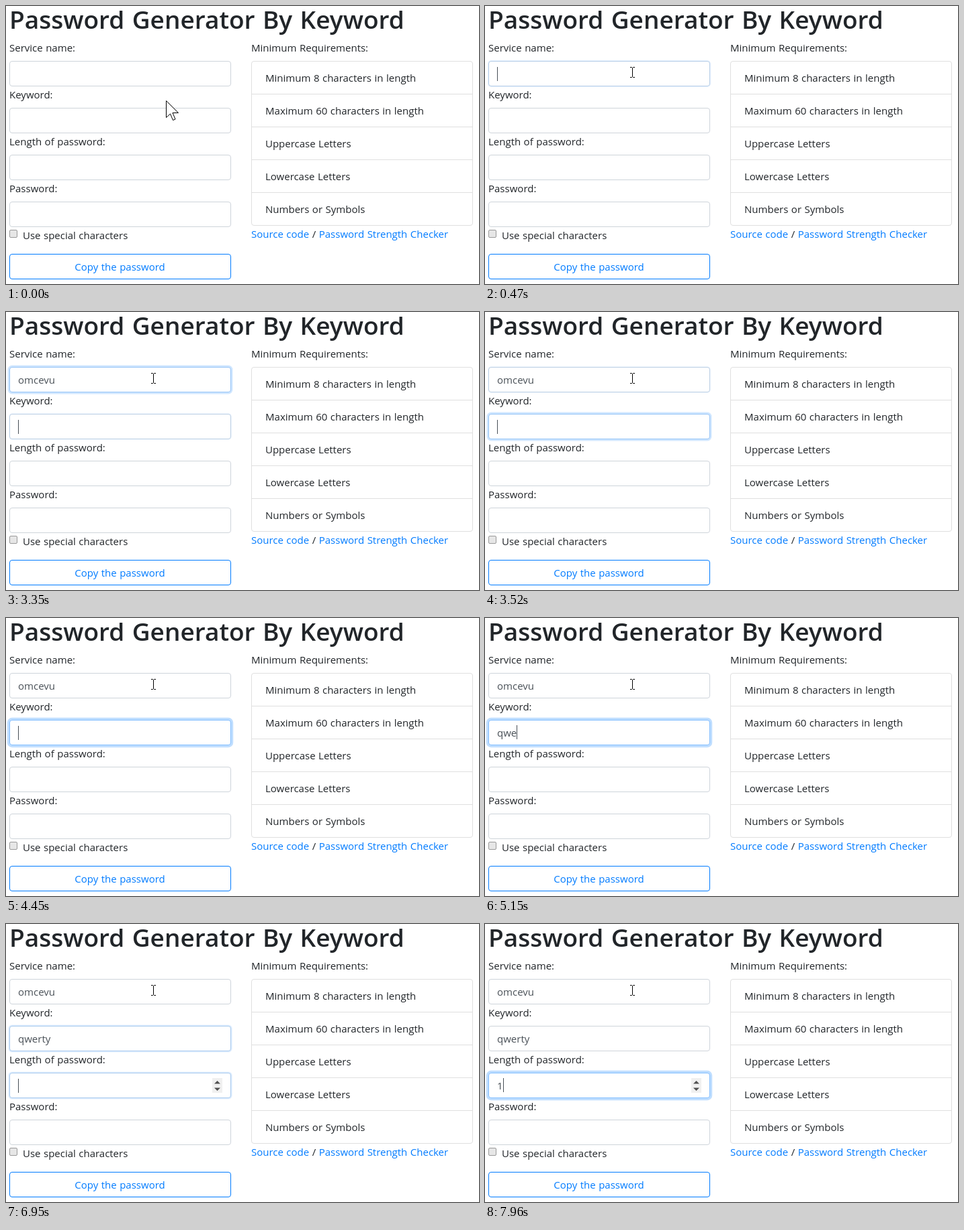
These frames come from a looping animation (704 px wide and 415 px high, 8 s). An HTML page:

```html
<!DOCTYPE html>
<html lang="en">
<head>
<meta charset="utf-8">
<title>Password Generator By Keyword</title>
<style>
  html, body { margin: 0; width: 100%; height: 100%; overflow: hidden; background: #fff; }
  svg { display: block; }
  text { font: 15px "Open Sans", "Noto Sans", sans-serif; word-spacing: .6px; fill: #212529; white-space: pre; }
  .title { font-size: 37px; font-weight: 600; word-spacing: 1.8px; }
  .link { fill: #007bff; }
  .value { fill: #495057; }
  .box { fill: #fff; stroke: #ced4da; }
  .list { fill: none; stroke: #dfdfdf; }
</style>
</head>
<body>
<svg id="stage" width="704" height="415" viewBox="0 0 704 415">
  <text class="title" x="5" y="34">Password Generator By Keyword</text>
  <g id="form"></g>

  <rect x="5.5" y="334.5" width="11" height="11" rx="1.5" fill="#e6e6e6" stroke="#999"/>
  <text x="25" y="348">Use special characters</text>
  <rect x="5.5" y="370.5" width="329" height="37" rx="3.5" fill="#fff" stroke="#007bff"/>
  <text class="link" x="169.5" y="395" text-anchor="middle">Copy the password</text>

  <text x="365" y="68">Minimum Requirements:</text>
  <rect class="list" x="365.5" y="82.5" width="329" height="245" rx="3.5"/>
  <g id="rules"></g>
  <text x="365" y="346"><tspan class="link">Source code</tspan> / <tspan class="link">Password Strength Checker</tspan></text>

  <g id="spinner">
    <rect x="307" y="230" width="15" height="22" fill="#f0f0f0"/>
    <path d="M310 238.5l4.5-4.5 4.5 4.5zM310 244.5l4.5 4.5 4.5-4.5z" fill="#505050"/>
  </g>
  <rect id="caret" width="1" height="21" fill="#495057"/>
  <path id="arrow" d="M.5 .5V25.5L6.5 20L10.5 29.5L14 28L10 18.5H18.5Z" fill="#fff" stroke="#000"/>
  <path id="beam" d="M-3 -7.5H-.5L.5 -6.5L1.5 -7.5H4M-3 7.5H-.5L.5 6.5L1.5 7.5H4M.5 -6.5V6.5" fill="none" stroke="#000"/>
</svg>
<script>
const LOOP = 8000;
const $ = id => document.getElementById(id);

function add(parent, tag, attrs, text = '') {
  const el = document.createElementNS('http://www.w3.org/2000/svg', tag);
  set(el, attrs);
  el.textContent = text;
  return parent.appendChild(el);
}

const set = (el, attrs) => { for (const key in attrs) el.setAttribute(key, attrs[key]); };
const show = (el, on) => el.setAttribute('visibility', on ? 'visible' : 'hidden');
const mix = (a, b, p) => a + (b - a) * p;

// Progress from 0 to 1 in n held steps, the first at start and the last at end.
function stepped(t, start, end, n) {
  const k = Math.floor((t - start) / (end - start) * (n - 1)) + 1;
  return Math.max(0, Math.min(n, k)) / n;
}

// focus: [start, end, steps]; keys: times of the key presses; off: spans with a hidden caret
const fields = [
  { label: 'Service name:', text: 'omcevu', focus: [470, 660, 3],
    keys: [1010, 1400, 1650, 2030, 2240, 2820], off: [] },
  { label: 'Keyword:', text: 'qwerty', focus: [3350, 3590, 4],
    keys: [4540, 4850, 5150, 5470, 5700, 6030], off: [[3980, 4450], [6570, 6860]] },
  { label: 'Length of password:', text: '1', focus: [6860, 7100, 4],
    keys: [7960], off: [[7430, 7960]] },
  { label: 'Password:', text: '', keys: [], off: [] }
];

fields.forEach((f, i) => {
  f.top = 82 + 70 * i;
  f.ring = add($('form'), 'rect', { fill: '#007bff' });
  f.box = add($('form'), 'rect', { class: 'box', x: 5.5, y: f.top + .5, width: 329, height: 37, rx: 3.5 });
  f.value = add($('form'), 'text', { class: 'value', x: 18, y: f.top + 25 });
});
// Labels go last so that the focus rings stay beneath them.
fields.forEach(f => add($('form'), 'text', { x: 5, y: f.top - 14 }, f.label));

['Minimum 8 characters in length', 'Maximum 60 characters in length',
  'Uppercase Letters', 'Lowercase Letters', 'Numbers or Symbols'].forEach((rule, i) => {
  const y = 82 + 49 * i;
  add($('rules'), 'text', { x: 386, y: y + 31 }, rule);
  if (i) add($('rules'), 'path', { class: 'list', d: `M365 ${y + .5}H695` });
});

function drawField(f, next, t) {
  const on = f.focus ? stepped(t, ...f.focus) : 0;
  const p = on - (next && next.focus ? stepped(t, ...next.focus) : 0);
  const s = 3.2 * p;
  const rgb = [mix(206, 128, p), mix(212, 189, p), mix(218, 255, p)].map(Math.round);
  f.box.style.stroke = `rgb(${rgb})`;
  set(f.ring, { x: 5 - s, y: f.top - s, width: 330 + 2 * s, height: 38 + 2 * s, rx: 4 + s, 'fill-opacity': .25 * p });
  f.value.textContent = f.text.slice(0, f.keys.filter(k => t >= k).length);
}

function drawCaret(t) {
  const f = fields.filter(f => f.focus && t >= f.focus[0]).pop();
  show($('caret'), f && !f.off.some(([a, b]) => t >= a && t < b));
  if (!f) return;
  const typed = f.value.textContent;
  const width = typed ? f.value.getComputedTextLength() : 0;
  set($('caret'), { x: Math.round(18 + width), y: f.top + (typed ? 8 : 9) });
}

function drawPointer(t) {
  const p = stepped(t, 80, 320, 4);
  const x = Math.round(mix(238, 219, p)), y = Math.round(mix(141, 99, p));
  const inside = y < 120;
  show($('arrow'), !inside);
  show($('beam'), inside);
  set(inside ? $('beam') : $('arrow'), { transform: `translate(${x} ${y})` });
}

function frame(now) {
  const t = now % LOOP;
  fields.forEach((f, i) => drawField(f, fields[i + 1], t));
  show($('spinner'), t >= fields[2].focus[0]);
  drawCaret(t);
  drawPointer(t);
  requestAnimationFrame(frame);
}
requestAnimationFrame(frame);
</script>
</body>
</html>
```
